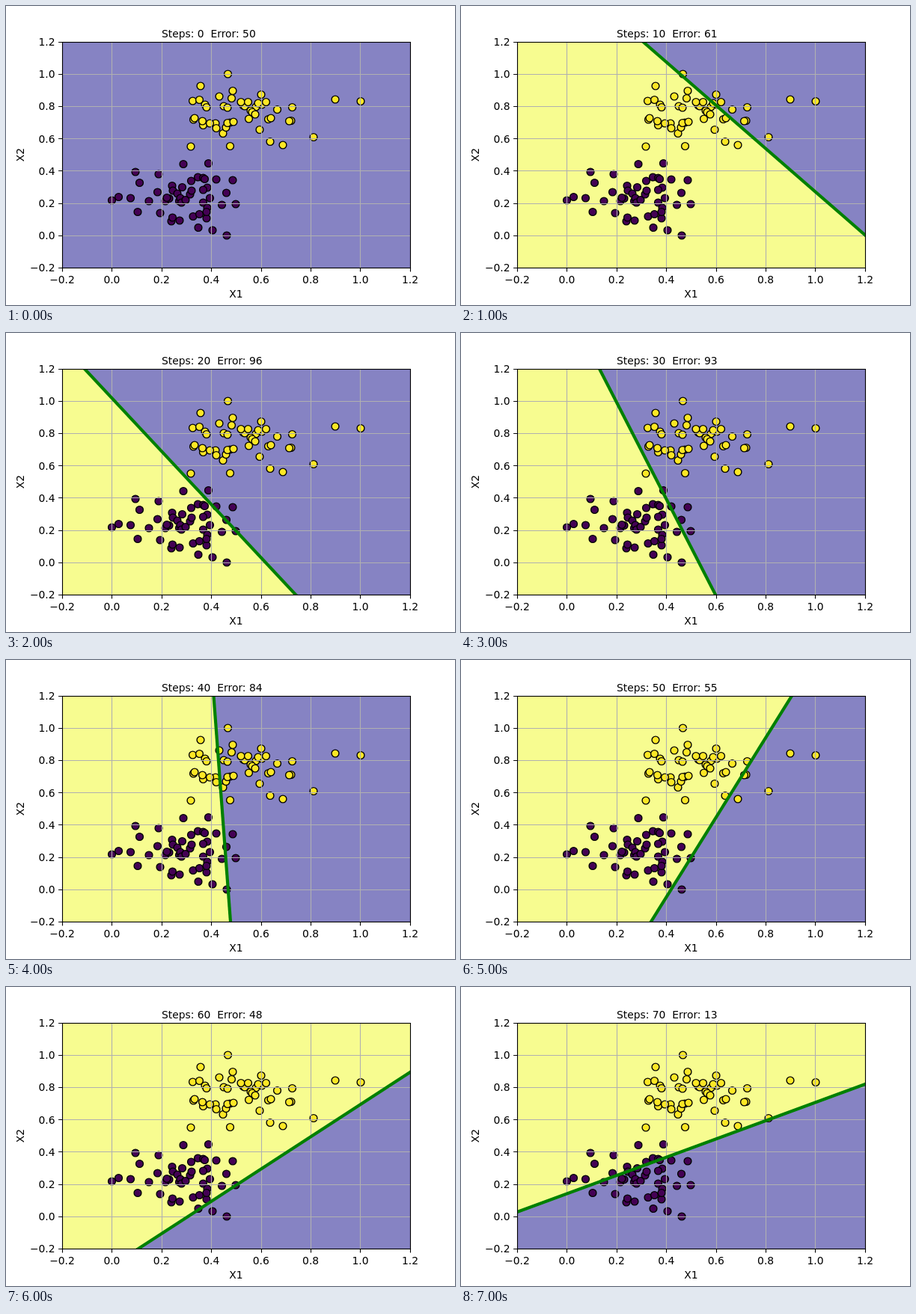
Animation of 600 by 400 pixels, one loop 8000 ms. Source, as an HTML page:

```html
<!DOCTYPE html>
<html lang="en">
<head>
<meta charset="utf-8">
<title>Training a linear classifier</title>
<style>
  html, body { margin: 0; width: 100%; height: 100%; overflow: hidden; background: #fff; }
  svg { display: block; width: 600px; height: 400px; }
  text { font: 13.89px "DejaVu Sans", sans-serif; white-space: pre; }
  .mid { text-anchor: middle; }
  .end { text-anchor: end; }
  .dot { stroke: #000; stroke-width: 1.39; }
  .grid { stroke: #b0b0b0; stroke-width: 1.11; }
  .axis { stroke: #000; stroke-width: 1.11; fill: none; }
  #line { stroke: #008000; stroke-width: 4.17; }
</style>
</head>
<body>
<svg viewBox="0 0 600 400">
  <clipPath id="plot"><rect x="75" y="48" width="465" height="302"/></clipPath>
  <rect x="75" y="48" width="465" height="302" fill="#8683c3"/>
  <g clip-path="url(#plot)"><path id="region" fill="#f7fc90"/></g>
  <g id="dots"></g>
  <g id="grid"></g>
  <g clip-path="url(#plot)"><path id="line"/></g>
  <rect class="axis" x="75.5" y="48.5" width="465" height="302"/>
  <g id="ticks"></g>
  <text id="title" x="207.9" y="42"></text>
  <text class="mid" x="307.5" y="390">X1</text>
  <text class="mid" transform="translate(23.5 199) rotate(-90)">X2</text>
</svg>
<script>
const $ = id => document.getElementById(id);

function add(parent, tag, attrs, text = '') {
  const el = document.createElementNS('http://www.w3.org/2000/svg', tag);
  for (const k in attrs) el.setAttribute(k, attrs[k]);
  el.textContent = text;
  $(parent).append(el);
}

const upper = [
  296.5,91, 260,107, 303,113.5, 285,121, 301.5,123.5, 341,118.5, 249.5,127,
  258.5,125.5, 266,132, 268,135.5, 291,134, 296,136, 317,133, 319,134,
  314,128.5, 334,135, 342,132, 323.5,128.5, 337,130, 347.5,128.5, 327,140,
  329,142, 333,145, 362.5,138.5, 382.5,135.5, 440,125, 474,127.5, 250.5,152,
  252,150, 263.5,159.5, 262.5,154, 280,157, 272.5,157, 281,163.5, 290,170.5,
  294,162.5, 299,156, 296,156.5, 304,155, 324.5,151, 350.5,151.5, 354,150,
  339,165.5, 381,153.5, 378.5,154, 247,188, 299.5,187.5, 353,181.5, 370,186,
  411,175.5
];
const lower = [
  141.5,260, 150.5,255.5, 166.5,257, 173,222, 178.5,236.5, 176,275.5, 191,261,
  202.5,249, 204,225, 206,277, 213,261, 218,257.5, 215,256.5, 222,240.5,
  223,247, 221,288, 222.5,283, 229,251, 232,287, 231.5,261, 233,257,
  234.5,263, 235.5,242.5, 237,211.5, 240,259.5, 246,252, 247.5,234, 248,247,
  250,281.5, 256.5,229, 257,296.5, 258.5,278.5, 263.5,230, 265.5,231.5,
  269,243, 263.5,246, 263.5,263, 272.5,257, 270.5,210.5, 269,270, 268,284,
  268,275.5, 281,232, 288.5,266, 294.5,250, 303,233, 307,265, 276,300, 295,307
];

function scatter(points, fill) {
  for (let i = 0; i < points.length; i += 2)
    add('dots', 'circle', { class: 'dot', cx: points[i], cy: points[i + 1], r: 4.91, fill });
}
scatter(lower, '#440154');
scatter(upper, '#fde725');

const snap = v => Math.round(v - 0.5) + 0.5;
for (let i = 0; i < 8; i++) {
  const px = 75 + 465 * i / 7, py = 350 - 302 * i / 7;
  const x = snap(px + 0.3), y = snap(py + 0.3);
  const label = (i * 0.2 - 0.2).toFixed(1).replace(/^-(?=0\.2)/, '\u2212').replace('-', '');
  if (i % 7) {
    add('grid', 'path', { class: 'grid', d: `M${x} 48V350` });
    add('grid', 'path', { class: 'grid', d: `M75 ${y}H540` });
  }
  add('ticks', 'path', { class: 'axis', d: `M${x} 350v5.4M75 ${y}h-4.9` });
  add('ticks', 'text', { class: 'mid', x: px, y: 371 }, label);
  add('ticks', 'text', { class: 'end', x: 65.6, y: py + 5.2 }, label);
}

// error count, then the boundary from its lower to its upper end
const steps = [
  [50],
  [61, 540, 306.5, 243.5, 48],
  [96, 387, 350, 105, 48],
  [93, 340, 350, 185, 48],
  [84, 300, 350, 277.5, 48],
  [55, 254, 350, 442, 48],
  [48, 177, 350, 540, 114],
  [13, 75, 301, 540, 130]
];

let shown = -1;
function draw() {
  const n = Math.floor(performance.now() / 1000) % steps.length;
  if (n !== shown) {
    shown = n;
    const [error, x1, y1, x2, y2] = steps[n];
    $('title').textContent = `Steps: ${n * 10}  Error: ${error}`;
    let edge = '', area = '';
    if (n) {
      const dx = x2 - x1, dy = y2 - y1;
      edge = `M${x1 - dx} ${y1 - dy}L${x2 + dx} ${y2 + dy}`;
      area = `${edge}l${4 * dy} ${-4 * dx}l${-3 * dx} ${-3 * dy}z`;
    }
    $('line').setAttribute('d', edge);
    $('region').setAttribute('d', area);
  }
  requestAnimationFrame(draw);
}
draw();
</script>
</body>
</html>
```
